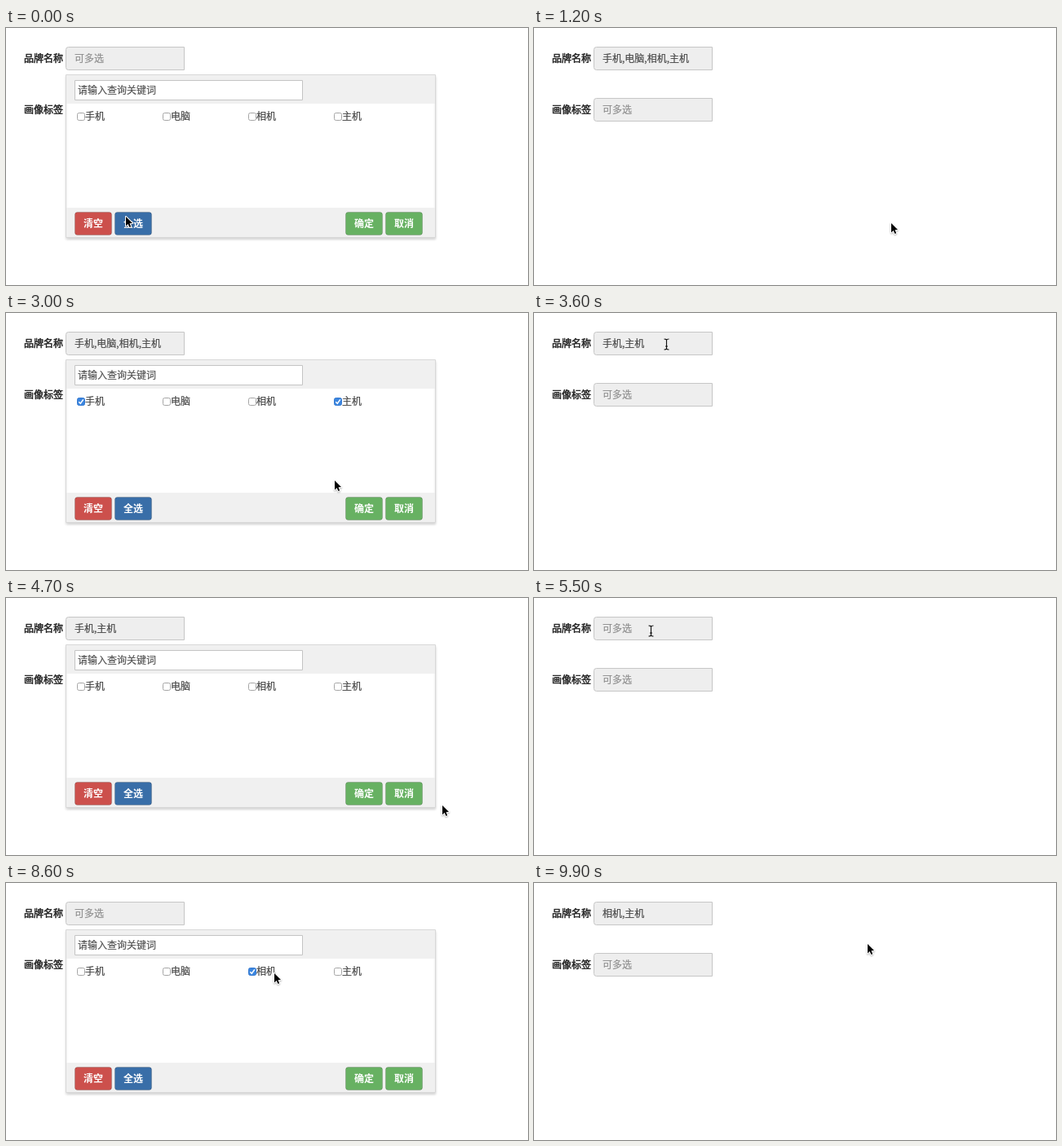
An HTML page with a canvas that plays this animation: 640 by 316 pixels, repeating every 10000 ms.

```html
<!DOCTYPE html>
<html lang="zh-CN">
<head>
<meta charset="utf-8">
<title>多选弹层</title>
<style>
html, body { margin: 0; width: 100%; height: 100%; overflow: hidden; background: #fff; }
canvas { display: block; width: 640px; height: 316px; }
</style>
</head>
<body>
<canvas id="stage"></canvas>
<script>
const W = 640, H = 316, LOOP = 10000, STEP = 100;
const canvas = document.getElementById('stage');
const ctx = canvas.getContext('2d');
const dpr = window.devicePixelRatio || 1;
canvas.width = W * dpr;
canvas.height = H * dpr;

const FONT = '"Noto Sans CJK SC", "Noto Sans CJK", sans-serif';
const OPTIONS = ['手机', '电脑', '相机', '主机'];
const HINT = '可多选';
const RED = '#cc504c', BLUE = '#396ea8', GREEN = '#67b162';
const BUTTONS = [[84, '清空', RED], [133, '全选', BLUE], [416, '确定', GREEN], [465, '取消', GREEN]];

const FIELD = { x: 73, y: 23, w: 146, h: 29 };
const SECOND = { ...FIELD, y: 86 };
const SEARCH = { x: 84, y: 64, w: 280, h: 25 };
const optionX = i => Math.round(86.8 + i * 105.2);

// What a click does
const toggle = i => s => { s.on[i] = !s.on[i]; s.focus = false; };
const setAll = v => s => { s.on.fill(v); s.focus = false; };
const open = s => {
  s.open = s.focus = true;
  s.on = OPTIONS.map(o => s.value.includes(o));
};
const close = s => { s.open = s.focus = false; };
const confirm = s => {
  s.value = OPTIONS.filter((o, i) => s.on[i]);
  close(s);
};

// Pointer stops: time of the click, place, action
const ALL = [147, 231], CLEAR = [107, 238], OK = [438, 239];
const pick = (t, i) => [t, [optionX(i) + 6, 108], toggle(i)];
const STOPS = [
  [0, ALL],
  [300, ALL, setAll(true)],
  [1200, OK, confirm],
  [1900, [168, 38], open],
  pick(2400, 1),
  pick(2800, 2),
  [3200, OK, confirm],
  [3400, [185, 14]],
  [3700, [162, 38], open],
  [4300, CLEAR, setAll(false)],
  [4700, [535, 254]],
  [5000, OK, confirm],
  [5600, [143, 40], open],
  pick(6200, 1),
  pick(6500, 2),
  pick(6800, 3),
  [7400, [572, 111], close],
  [7800, [150, 37], open],
  [8600, [329, 110], toggle(2)],
  pick(9000, 3),
  [9500, OK, confirm],
  [LOOP, [409, 74]]
];

function stateAt(t) {
  const s = { open: true, focus: false, on: OPTIONS.map(() => false), value: [] };
  for (const [at, , act] of STOPS) if (act && t >= at) act(s);
  return s;
}

// The pointer eases between stops and rests one step before each click
function pointerAt(t) {
  const i = STOPS.findIndex(stop => stop[0] > t);
  const [t0, [x0, y0]] = STOPS[i - 1], [t1, [x1, y1]] = STOPS[i];
  const k = Math.min(1, (t - t0) / (t1 - STEP - t0));
  const e = k * k * (3 - 2 * k);
  return [x0 + (x1 - x0) * e, y0 + (y1 - y0) * e];
}

// `heavy` thickens the strokes to a medium weight
function text(str, x, y, color, heavy = .2, weight = 400) {
  ctx.font = `${weight} 12px ${FONT}`;
  ctx.fillStyle = ctx.strokeStyle = color;
  ctx.fillText(str, x, y);
  if (heavy) {
    ctx.lineWidth = heavy;
    ctx.strokeText(str, x, y);
  }
}

function box({ x, y, w, h }, r, fill, stroke) {
  ctx.beginPath();
  ctx.roundRect(x + .5, y + .5, w - 1, h - 1, r);
  ctx.fillStyle = fill;
  ctx.fill();
  ctx.strokeStyle = stroke;
  ctx.lineWidth = 1;
  ctx.stroke();
}

function shadow(color, blur, dy) {
  ctx.shadowColor = color;
  ctx.shadowBlur = blur * dpr;
  ctx.shadowOffsetY = dy * dpr;
}

function field(area, label, value, focus) {
  const base = area.y + 19;
  text(label, 22, base, '#222', .5);
  ctx.save();
  if (focus) shadow('rgba(102,175,233,.35)', 4, 0);
  box(area, [3, 0, 0, 3], '#eee', focus ? '#78b2de' : '#c6c6c6');
  ctx.restore();
  text(value || HINT, 84, base, value ? '#484848' : '#8e8e8e');
}

function checkbox(x, label, on) {
  box({ x, y: 104, w: 10, h: 10 }, 2, on ? '#3b86e0' : '#fff', on ? '#3579cf' : '#a5a5a5');
  if (on) {
    ctx.beginPath();
    ctx.moveTo(x + 2.3, 109.2);
    ctx.lineTo(x + 4.3, 111.3);
    ctx.lineTo(x + 7.8, 106.4);
    ctx.strokeStyle = '#fff';
    ctx.lineWidth = 1.5;
    ctx.stroke();
  }
  text(label, x + 10, 113, '#444');
}

function popup(on) {
  ctx.save();
  shadow('rgba(0,0,0,.16)', 3, 2);
  box({ x: 73, y: 57, w: 454, h: 201 }, 0, '#fff', '#d8d8d8');
  ctx.restore();
  ctx.fillStyle = '#f0f0f0';
  ctx.fillRect(74, 58, 452, 35);
  ctx.fillRect(74, 221, 452, 36);
  box(SEARCH, 0, '#fff', '#c4c4c4');
  text('请输入查询关键词', 88, 81, '#505050');
  OPTIONS.forEach((o, i) => checkbox(optionX(i), o, on[i]));
  for (const [x, label, color] of BUTTONS) {
    box({ x, y: 226, w: 46, h: 29 }, 3, color, 'rgba(0,0,0,.16)');
    text(label, x + 11, 245, '#fff', 0, 700);
  }
}

function arrow(x, y) {
  ctx.save();
  ctx.translate(x, y + 1);
  ctx.beginPath();
  for (const [px, py] of [[0, 0], [0, 11.4], [2.6, 9], [4.5, 13], [6.2, 12.2], [4.5, 8.2], [8, 8]]) {
    ctx.lineTo(px, py);
  }
  ctx.closePath();
  shadow('rgba(0,0,0,.3)', 2, 1);
  ctx.lineJoin = 'round';
  ctx.lineWidth = 2;
  ctx.strokeStyle = '#fff';
  ctx.stroke();
  ctx.shadowColor = 'transparent';
  ctx.fillStyle = '#000';
  ctx.fill();
  ctx.restore();
}

function beam(x, y) {
  ctx.save();
  ctx.translate(Math.round(x) + .5, Math.round(y) + .5);
  for (const [color, width] of [['rgba(255,255,255,.7)', 2.6], ['#111', 1.2]]) {
    ctx.strokeStyle = color;
    ctx.lineWidth = width;
    ctx.beginPath();
    for (const d of [-1, 1]) {
      ctx.moveTo(-3, d * 6.5);
      ctx.quadraticCurveTo(0, d * 6.5, 0, d * 5);
      ctx.quadraticCurveTo(0, d * 6.5, 3, d * 6.5);
    }
    ctx.moveTo(0, -5.5);
    ctx.lineTo(0, 5.5);
    ctx.moveTo(-1.5, 2.5);
    ctx.lineTo(1.5, 2.5);
    ctx.stroke();
  }
  ctx.restore();
}

const within = (px, py, { x, y, w, h }) => px >= x && px < x + w && py >= y && py < y + h;

function draw(t) {
  const s = stateAt(t), [x, y] = pointerAt(t);
  ctx.setTransform(dpr, 0, 0, dpr, 0, 0);
  ctx.fillStyle = '#fff';
  ctx.fillRect(0, 0, W, H);
  field(FIELD, '品牌名称', s.value.join(','), s.focus);
  field(SECOND, '画像标签', '', false);
  if (s.open) popup(s.on);
  const overText = within(x, y, FIELD) || within(x, y, s.open ? SEARCH : SECOND);
  (overText ? beam : arrow)(x, y);
}

const start = performance.now();
function tick() {
  const t = (performance.now() - start) % LOOP;
  draw(Math.floor(t / STEP) * STEP);
  requestAnimationFrame(tick);
}
tick();
</script>
</body>
</html>
```
